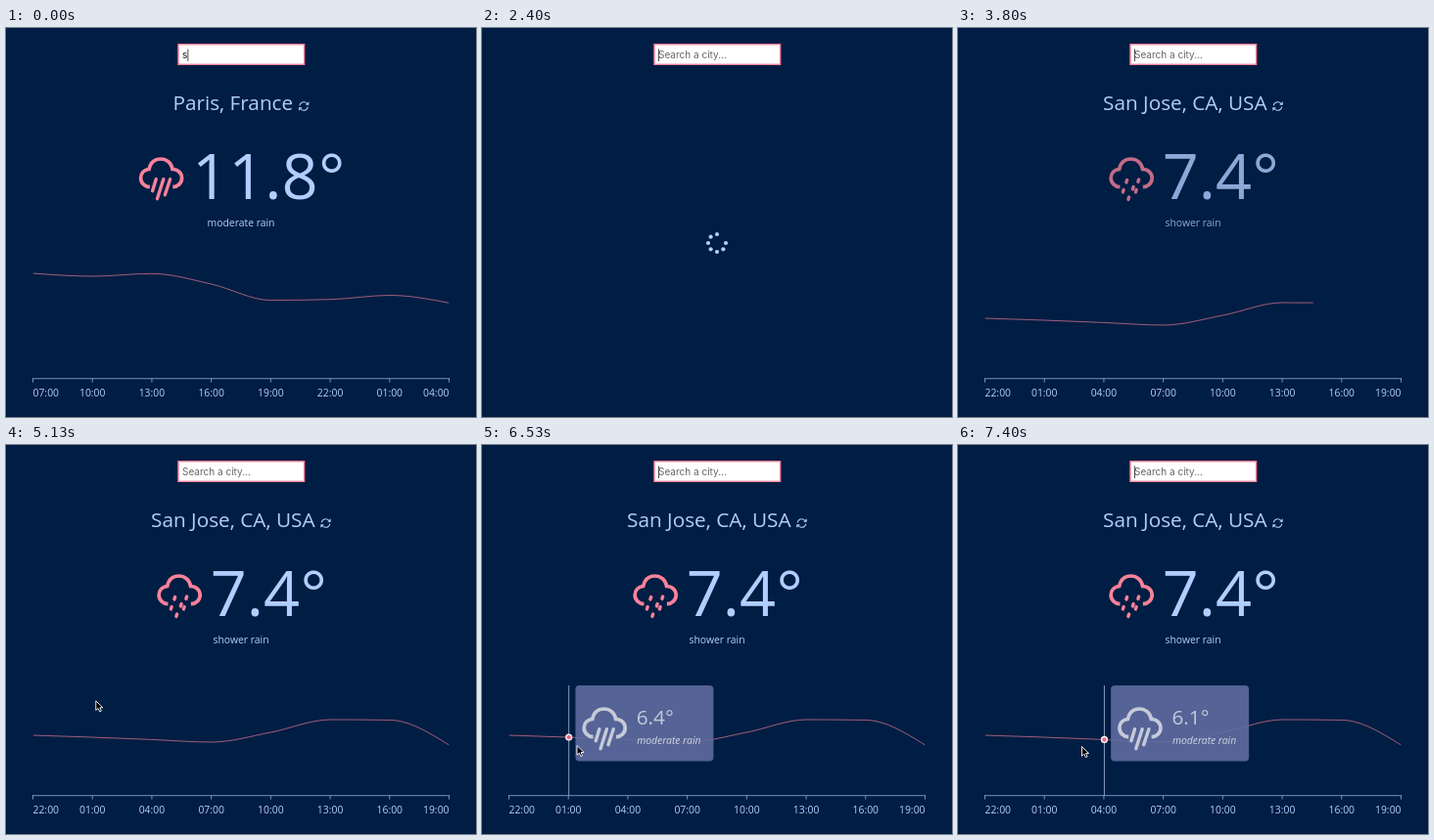
Animation, 480 px wide and 398 px high, one loop 7.54 s. Source, as an HTML page with a canvas:

```html
<!DOCTYPE html>
<html lang="en">
<head>
<meta charset="utf-8">
<title>Weather</title>
<style>
  html, body { margin: 0; width: 100%; height: 100%; overflow: hidden; background: #001d43; }
  canvas { display: block; width: 480px; height: 398px; }
</style>
</head>
<body>
<canvas></canvas>
<script>
const canvas = document.querySelector('canvas');
const ctx = canvas.getContext('2d');
const ratio = window.devicePixelRatio || 1;
canvas.width = 480 * ratio;
canvas.height = 398 * ratio;

const LOOP = 7540;
const NAVY = '#001d43', BLUE = '#b1ceff', PINK = '#f8829a';
const LEFT = 27.5, RIGHT = 452.5, STEP = (RIGHT - LEFT) / 7;
const LOADING = 2400, LOADED = 3070, REVEAL = 1500;

const SMALL = 10.38, MEDIUM = 20.76, LARGE = 64.9;
const sans = (size, style = '') => `${style} 400 ${size}px "Open Sans", sans-serif`;
const INPUT_FONT = '10px Inter, sans-serif';

const PARIS = {
  name: 'Paris, France', temp: '11.8°', sky: 'moderate rain', firstHour: 7,
  ys: [251, 254, 251.3, 262, 278.5, 277.7, 273.5, 281.3]
};
const SAN_JOSE = {
  name: 'San Jose, CA, USA', temp: '7.4°', sky: 'shower rain', firstHour: 22,
  ys: [297, 299, 301.4, 304, 294, 281, 281.4, 307]
};
const CITIES = ['San Francisco, CA, USA', 'San Diego, CA, USA', 'San Antonio, TX, USA',
  'San Jose, CA, USA', 'Santiago, Chile'];

// [start, typed text, highlighted row]; row -2 means the list is closed
const ENTRIES = [
  [0, 's', -2], [67, 'sa', -2], [333, 'sa', -1], [667, 'san', -1], [1000, CITIES[0], 0],
  [1533, CITIES[1], 1], [1600, CITIES[2], 2], [1867, CITIES[3], 3], [2000, CITIES[3], -2],
  [LOADING, '', -2]
];

// [time, x, y]
const POINTER = [
  [4400, 75, 228], [4733, 91, 258], [5070, 91, 258], [5400, 94, 292],
  [5733, 96.5, 307], [6600, 96.5, 307], [7133, 126, 308]
];

function text(str, x, y, font, color, align = 'left') {
  ctx.font = font;
  ctx.fillStyle = color;
  ctx.textAlign = align;
  ctx.fillText(str, x, y);
}

function line(x1, y1, x2, y2) {
  ctx.beginPath();
  ctx.moveTo(x1, y1);
  ctx.lineTo(x2, y2);
  ctx.stroke();
}

// CSS "ease"
function ease(x) {
  if (x <= 0) return 0;
  if (x >= 1) return 1;
  const bez = (u, a, b) => 3 * u * (1 - u) ** 2 * a + 3 * u * u * (1 - u) * b + u ** 3;
  let lo = 0, hi = 1;
  for (let i = 0; i < 20; i++) {
    const mid = (lo + hi) / 2;
    if (bez(mid, .25, .25) < x) lo = mid; else hi = mid;
  }
  return bez(lo, .1, 1);
}

function drawCloud(x, y, sky, color) {
  ctx.save();
  ctx.translate(x, y);
  ctx.strokeStyle = color;
  ctx.lineWidth = 3.7;
  ctx.lineCap = 'butt';
  ctx.stroke(new Path2D('M11.3 31C6 30.8 2 26.8 2 21.8C2 16.8 5.5 13.3 10.5 12.6' +
    'C12 6 16.5 2.3 22.3 2.3C28.7 2.3 33.4 6.6 34.4 12.8C40 12.8 44 16.8 44 21.8C44 26.8 40 30.8 34.7 31'));
  ctx.lineCap = 'round';
  ctx.lineWidth = 3.4;
  if (sky === 'moderate rain') {
    line(17.6, 23, 14, 35);
    line(25.2, 23, 18.8, 43);
    line(32, 23, 26.7, 39);
  } else {
    for (const [dx, dy] of [[18, 25], [14.5, 35], [24.5, 32], [20, 42.5], [30, 24.5], [27.5, 35]])
      line(dx + .5, dy - 1.2, dx - .3, dy + 1.2);
  }
  ctx.restore();
}

function drawRefresh(x, y) {
  ctx.save();
  ctx.translate(x, y);
  ctx.strokeStyle = ctx.fillStyle = BLUE;
  ctx.lineWidth = 1.1;
  for (let i = 0; i < 2; i++) {
    ctx.beginPath();
    ctx.arc(0, 0, 4.3, Math.PI * 1.05, Math.PI * 1.8);
    ctx.stroke();
    ctx.fill(new Path2D('M5.2 -4.8V-1.2H1.6Z'));
    ctx.rotate(Math.PI);
  }
  ctx.restore();
}

// Monotone cubic through evenly spaced points
function curve(ys) {
  const slope = ys.slice(1).map((y, i) => (y - ys[i]) / STEP);
  const m = ys.map((_, i) => {
    const a = slope[i - 1], b = slope[i];
    if (a === undefined || b === undefined) return null;
    return (Math.sign(a) + Math.sign(b)) * Math.min(Math.abs(a), Math.abs(b), Math.abs(a + b) / 4);
  });
  m[0] = (3 * slope[0] - m[1]) / 2;
  m[7] = (3 * slope[6] - m[6]) / 2;
  const path = new Path2D();
  path.moveTo(LEFT, ys[0]);
  for (let i = 1; i < 8; i++) {
    const x = LEFT + i * STEP, d = STEP / 3;
    path.bezierCurveTo(x - 2 * d, ys[i - 1] + d * m[i - 1], x - d, ys[i] - d * m[i], x, ys[i]);
  }
  return path;
}

function drawChart(city, progress) {
  ctx.save();
  ctx.beginPath();
  ctx.rect(LEFT, 240, (RIGHT - LEFT) * progress, 100);
  ctx.clip();
  ctx.strokeStyle = PINK;
  ctx.lineWidth = .65;
  ctx.stroke(curve(city.ys));
  ctx.restore();

  ctx.strokeStyle = BLUE;
  ctx.lineWidth = .65;
  line(LEFT - .5, 358.7, RIGHT + .5, 358.7);
  for (let i = 0; i < 8; i++) {
    const x = LEFT + i * STEP;
    line(x, 358.7, x, 362.6);
    const hour = String((city.firstHour + 3 * i) % 24).padStart(2, '0') + ':00';
    const align = i === 0 ? 'left' : i === 7 ? 'right' : 'center';
    text(hour, x, 377, sans(SMALL), BLUE, align);
  }
}

function drawWeather(city, progress) {
  ctx.font = sans(MEDIUM);
  const nameWidth = ctx.measureText(city.name).width;
  const nameX = 240.3 - (nameWidth + 17) / 2;
  text(city.name, nameX, 84, sans(MEDIUM), BLUE);
  drawRefresh(nameX + nameWidth + 11, 80);

  ctx.globalAlpha = progress;
  ctx.font = sans(LARGE);
  const x = 240.3 - (56 + ctx.measureText(city.temp).width) / 2;
  drawCloud(x + 1.5, 131.7, city.sky, PINK);
  text(city.temp, x + 56, 174.5, sans(LARGE), BLUE);
  text(city.sky, 240, 203, sans(SMALL), BLUE, 'center');
  ctx.globalAlpha = 1;

  drawChart(city, progress);
}

function drawSpinner(t) {
  ctx.fillStyle = BLUE;
  for (let i = 0; i < 7; i++) {
    const a = -Math.PI / 2 - i * Math.PI / 4 + (t - LOADING) / 1000 * 2 * Math.PI;
    ctx.beginPath();
    ctx.arc(240 + 9 * Math.cos(a), 220 + 9 * Math.sin(a), 2.1, 0, 7);
    ctx.fill();
  }
}

function drawTooltip(index) {
  const x = LEFT + .5 + index * STEP, y = SAN_JOSE.ys[index];
  ctx.strokeStyle = '#aebcd8';
  ctx.lineWidth = .8;
  line(x, 246, x, 358.5);
  ctx.beginPath();
  ctx.arc(x, y, 2.9, 0, 7);
  ctx.fillStyle = '#f4657f';
  ctx.fill();
  ctx.strokeStyle = '#fff';
  ctx.lineWidth = 1.3;
  ctx.stroke();

  ctx.beginPath();
  ctx.roundRect(x + 6.7, 246, 141, 77.5, 4);
  ctx.fillStyle = 'rgba(97, 109, 162, .88)';
  ctx.fill();
  const gray = '#c5cad8';
  drawCloud(x + 13.5, 267.7, 'moderate rain', gray);
  text(index === 1 ? '6.4°' : '6.1°', x + 69, 286, sans(MEDIUM), gray);
  text('moderate rain', x + 69.5, 306, sans(SMALL, 'italic'), '#d0d5e1');
}

function drawInput(t) {
  const [start, value, row] = ENTRIES.filter(e => e[0] <= t + 5).pop();
  const rowHeight = 14.5;
  if (row > -2) {
    ctx.fillStyle = 'rgba(255, 255, 255, .88)';
    ctx.fillRect(175.5, 38, 129.5, 5 * rowHeight);
    CITIES.forEach((name, i) => {
      const y = 38 + i * rowHeight;
      if (i === row) {
        ctx.fillStyle = '#d97b93';
        ctx.fillRect(175.5, y, 129.5, rowHeight);
      }
      text(name, 179.8, y + 11.2, sans(SMALL), i === row ? '#f3e4ea' : '#26303f');
    });
  }
  ctx.fillStyle = PINK;
  ctx.fillRect(175.3, 16, 130, 22);
  ctx.fillStyle = '#fff';
  ctx.fillRect(176.7, 17.4, 127.2, 19.2);
  text(value || 'Search a city...', 180, 31.3, INPUT_FONT, value ? '#111' : '#666');

  const caretOn = row < 0 && (t - start + 5) % 1000 < 500;
  if (caretOn) {
    ctx.fillStyle = '#222';
    ctx.fillRect(180.2 + (value ? ctx.measureText(value).width : 0), 21.5, .8, 12.5);
  }
}

function pointerAt(t) {
  const next = POINTER.findIndex(p => p[0] > t);
  if (next < 0) return POINTER[POINTER.length - 1].slice(1);
  const [t0, x0, y0] = POINTER[next - 1], [t1, x1, y1] = POINTER[next];
  const k = (t - t0) / (t1 - t0), s = k * k * (3 - 2 * k);
  return [x0 + (x1 - x0) * s, y0 + (y1 - y0) * s];
}

function drawPointer(x, y) {
  ctx.save();
  ctx.translate(x, y);
  const arrow = new Path2D('M.5 .5V10.2L2.8 8.1L4.4 11.6L6.1 10.8L4.6 7.5H7.6Z');
  ctx.fillStyle = '#000';
  ctx.fill(arrow);
  ctx.strokeStyle = '#fff';
  ctx.lineWidth = .9;
  ctx.stroke(arrow);
  ctx.restore();
}

function draw(t) {
  ctx.setTransform(ratio, 0, 0, ratio, 0, 0);
  ctx.fillStyle = NAVY;
  ctx.fillRect(0, 0, 480, 398);

  if (t < LOADING - 5) drawWeather(PARIS, 1);
  else if (t < LOADED - 5) drawSpinner(t);
  else drawWeather(SAN_JOSE, ease((t - LOADED) / REVEAL));

  drawInput(t);
  if (t >= POINTER[0][0]) {
    const [x, y] = pointerAt(t);
    if (t > 5190) drawTooltip(x > LEFT + 1.5 * STEP ? 2 : 1);
    drawPointer(x, y);
  }
}

// The picture advances at 15 steps per second
const origin = performance.now();
function tick() {
  const t = (performance.now() - origin) % LOOP;
  draw(Math.min(111, Math.floor((t + 4) * .015)) / .015);
  requestAnimationFrame(tick);
}
tick();
</script>
</body>
</html>
```
